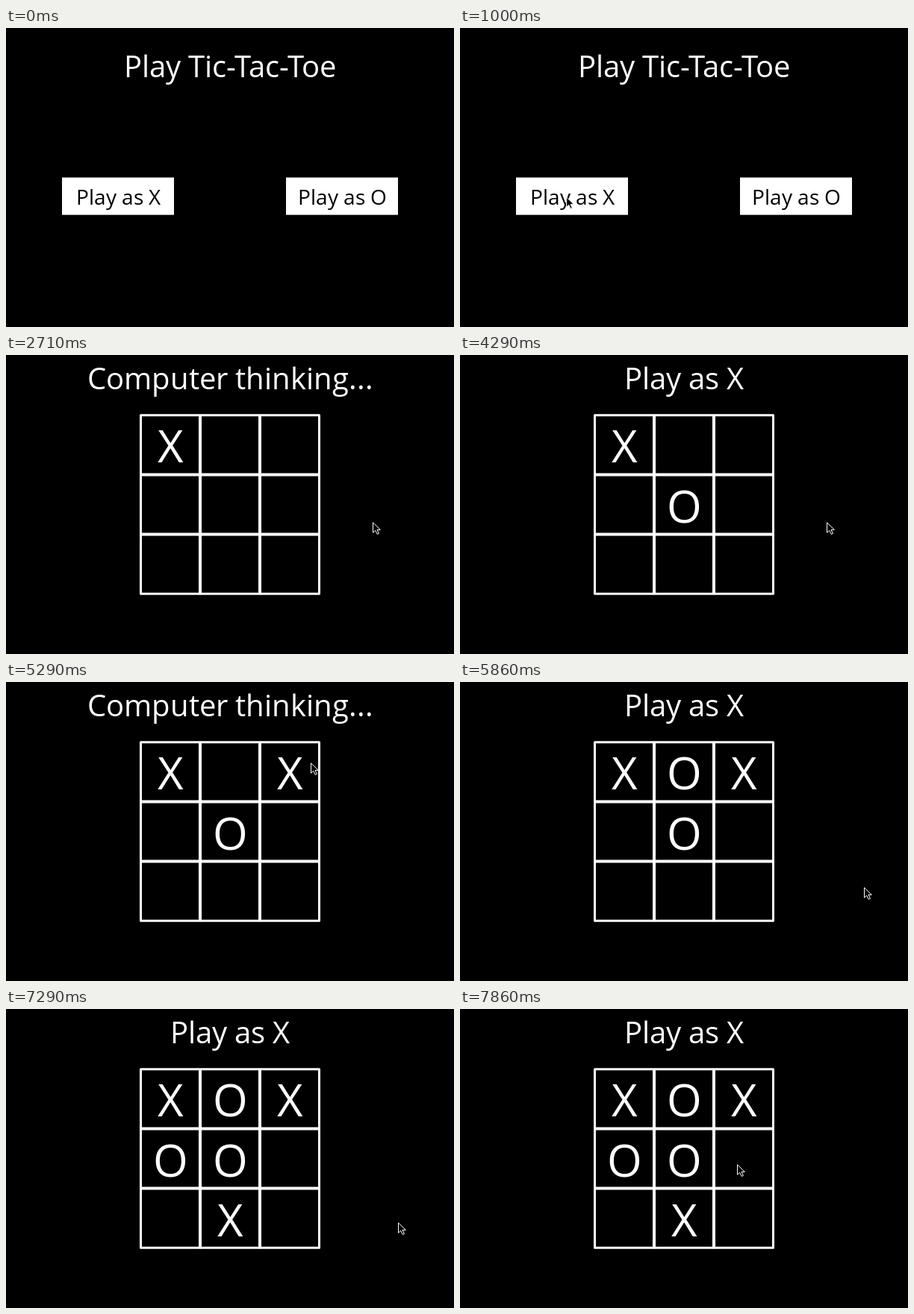
Recreate the animation shown at these times as an HTML page with a canvas. Size 600 px wide and 401 px high, loop 8 s.

```html
<!DOCTYPE html>
<html lang="en">
<head>
<meta charset="utf-8">
<title>Tic-Tac-Toe</title>
<style>
  html, body { margin: 0; width: 100%; height: 100%; overflow: hidden; background: #000; }
  canvas { display: block; }
</style>
</head>
<body>
<canvas id="stage" width="600" height="401"></canvas>
<script>
const ctx = document.getElementById('stage').getContext('2d');
const LOOP = 8000;
const STEPS_PER_SECOND = 7;
const CELL = 80;
const BOARD_START = 8;
const GLIDE = 3;

// All times are in steps. The player clicks a cell, the computer thinks, then replies.
const turns = [
  { click: 15, cell: 0, think: 15, reply: 4 },
  { click: 37, cell: 2, think: 4, reply: 1 },
  { click: 47, cell: 7, think: 4, reply: 3 }
];

// Places where the pointer pauses or turns.
const stops = [
  { at: 3, x: 72, y: 290 },
  { at: 7, x: 142, y: 226 },
  { at: 12, x: 395, y: 218 },
  { at: 14, x: 235, y: 129 },
  { at: 17, x: 491, y: 224 },
  { at: 35, x: 408, y: 108 },
  { at: 41, x: 541, y: 275 },
  { at: 47, x: 308, y: 280 },
  { at: 49, x: 525, y: 286 },
  { at: 55, x: 371, y: 208 }
];

const ease = u => u * u * (3 - 2 * u);

function pointerAt(step) {
  if (step < stops[0].at) return null;
  const index = stops.findIndex(s => s.at >= step);
  const to = stops[index];
  const from = stops[Math.max(0, index - 1)];
  const leave = Math.max(from.at, to.at - GLIDE);
  const u = step <= leave ? 0 : ease((step - leave) / (to.at - leave));
  const mix = (a, b) => Math.round(a + (b - a) * u);
  return { x: mix(from.x, to.x), y: mix(from.y, to.y) };
}

// Centred text with whole-pixel advances and kerning, as a bitmap font renderer lays it out.
function text(label, centerX, centerY, size, color = '#fff') {
  ctx.font = `${size}px "Open Sans", sans-serif`;
  ctx.fillStyle = color;
  const width = s => ctx.measureText(s).width;
  let end = 0;
  const glyphs = [...label].map((char, i) => {
    const before = label[i - 1] || '';
    const x = end + Math.round(width(before + char) - width(before) - width(char));
    end = x + Math.round(width(char));
    return { char, x };
  });
  const left = centerX - Math.floor(end / 2);
  const baseline = centerY + Math.round(size * 0.4);
  for (const { char, x } of glyphs) ctx.fillText(char, left + x, baseline);
}

function button(label, x) {
  ctx.fillStyle = '#fff';
  ctx.fillRect(x, 200, 150, 50);
  text(label, x + 75, 225, 28, '#000');
}

function drawMenu() {
  text('Play Tic-Tac-Toe', 300, 50, 40);
  button('Play as X', 75);
  button('Play as O', 375);
}

function drawMark(mark, cell) {
  text(mark, 220 + CELL * (cell % 3), 120 + CELL * Math.floor(cell / 3), 60);
}

function drawBoard(step) {
  ctx.strokeStyle = '#fff';
  ctx.lineWidth = 3;
  ctx.lineJoin = 'round';
  for (let i = 0; i < 9; i++) {
    ctx.strokeRect(180.5 + CELL * (i % 3), 80.5 + CELL * Math.floor(i / 3), CELL - 1, CELL - 1);
  }
  let thinking = false;
  for (const { click, cell, think, reply } of turns) {
    if (step < click) break;
    drawMark('X', cell);
    thinking = step < click + think;
    if (!thinking) drawMark('O', reply);
  }
  text(thinking ? 'Computer thinking...' : 'Play as X', 300, 30, 40);
}

function drawPointer({ x, y }) {
  const arrow = new Path2D('M.5 .8V14.2L3.7 11.3L6.2 16.4L8.4 15.4L6 10.4H10.3Z');
  ctx.save();
  ctx.translate(x, y);
  ctx.fillStyle = '#000';
  ctx.fill(arrow);
  ctx.strokeStyle = '#fff';
  ctx.lineWidth = 1;
  ctx.lineJoin = 'round';
  ctx.stroke(arrow);
  ctx.restore();
}

function draw(now) {
  // A few milliseconds of slack absorb rounding at step boundaries.
  const step = Math.min(55, Math.floor((now % LOOP + 5) * STEPS_PER_SECOND / 1000));
  ctx.fillStyle = '#000';
  ctx.fillRect(0, 0, 600, 401);
  ctx.save();
  ctx.scale(1, 401 / 400); // the layout is 400 high
  if (step < BOARD_START) drawMenu();
  else drawBoard(step);
  ctx.restore();
  const pointer = pointerAt(step);
  if (pointer) drawPointer(pointer);
}

let start;
function tick(now) {
  start ??= now;
  draw(now - start);
  requestAnimationFrame(tick);
}
draw(0);
requestAnimationFrame(tick);
</script>
</body>
</html>
```
